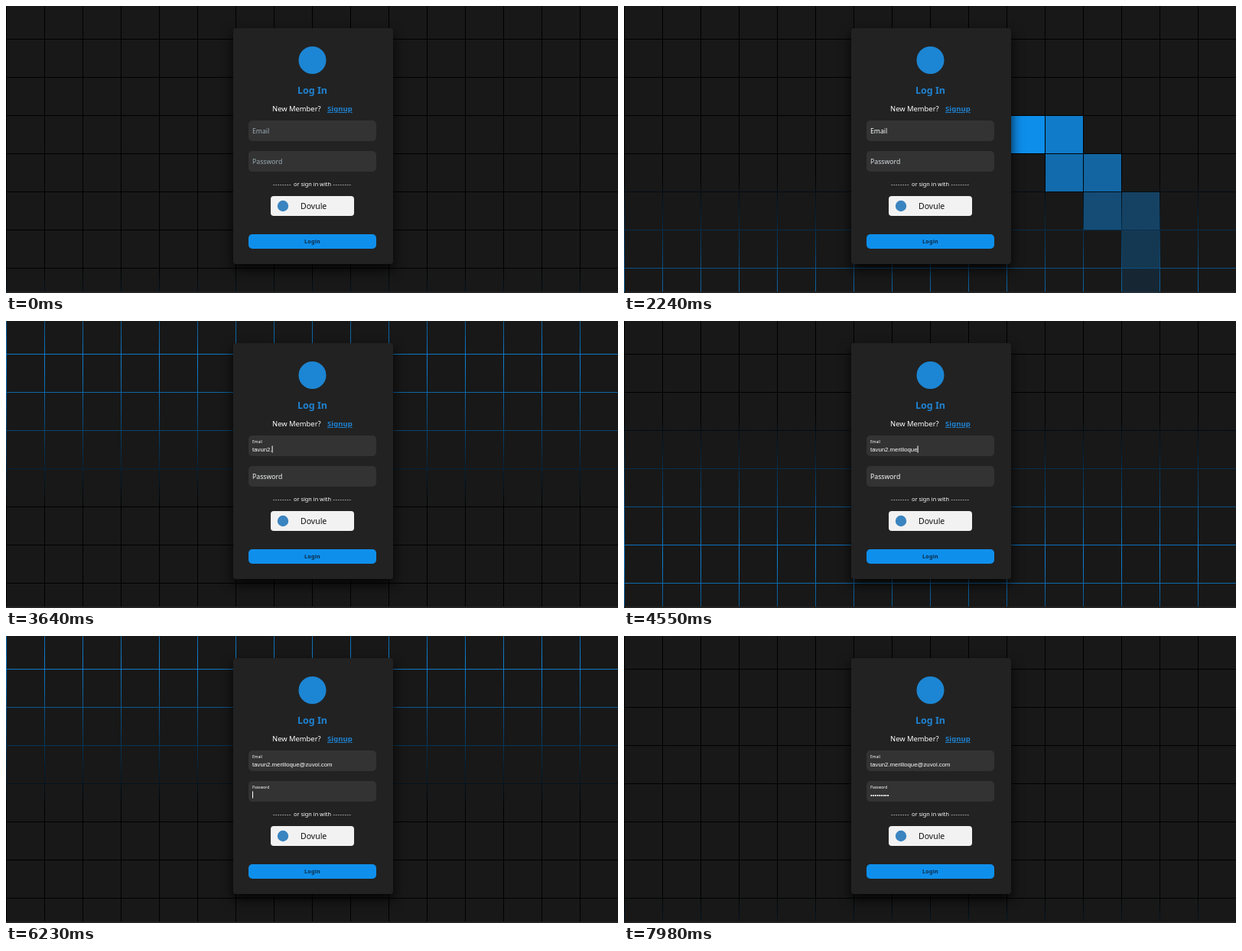
Animation of 800 by 376 pixels, one loop 8 s. Source, as an HTML page:

```html
<!DOCTYPE html>
<html lang="en">
<head>
<meta charset="utf-8">
<title>Log In</title>
<style>
  html, body { margin: 0; width: 100%; height: 100%; overflow: hidden; background: #000; }
  svg { display: block; width: 100vw; height: 100vh; }
  text { font-family: "Noto Sans", "Open Sans", sans-serif; white-space: pre; }
  .sweep { animation: sweep 2666.667ms linear -2556.667ms infinite; }
  .trail rect { fill: #0f8fec; animation: fade 8s infinite; }
  .field { fill: #333; }
  .value { font: 7.8px "Liberation Sans", Arial, sans-serif; fill: #fff; }
  .label { font-size: 8.7px; fill: #9babb3; animation: 8s infinite; }
  #emailLabel { animation-name: floatEmail; }
  #passLabel { animation-name: floatPass; }
  @keyframes sweep {
    from { transform: translateY(-376px); }
    to { transform: translateY(376px); }
  }
  /* Each cell starts at the moment the pointer leaves it. */
  @keyframes fade {
    0% { opacity: 1; animation-timing-function: ease; }
    10%, 99.1% { opacity: 0; animation-timing-function: step-end; }
    99.11%, 100% { opacity: 1; }
  }
  @keyframes floatEmail {
    0%, 35% { transform: translate(322px, 167px); }
    37%, 100% { transform: translate(322px, 160px) scale(.58); fill: #fff; }
  }
  @keyframes floatPass {
    0%, 75.5% { transform: translate(322px, 207px); }
    77.3%, 100% { transform: translate(322px, 200px) scale(.57); fill: #fff; }
  }
</style>
</head>
<body>
<svg viewBox="0 0 800 376" preserveAspectRatio="none">
  <defs>
    <linearGradient id="glow" x2="0" y2="1">
      <stop stop-color="#000"/>
      <stop offset=".5" stop-color="#1080d2"/>
      <stop offset="1" stop-color="#000"/>
    </linearGradient>
    <pattern id="cells" width="50" height="50" patternUnits="userSpaceOnUse" patternTransform="translate(0 43)">
      <rect x="1" y="1" width="49" height="49" fill="#181818"/>
    </pattern>
    <filter id="shadow" x="-20%" y="-20%" width="140%" height="140%">
      <feDropShadow dx="0" dy="7" stdDeviation="8" flood-color="#000" flood-opacity=".85"/>
    </filter>
  </defs>

  <rect width="800" height="376"/>
  <rect class="sweep" width="800" height="376" fill="url(#glow)"/>
  <rect width="800" height="376" fill="url(#cells)"/>
  <rect y="374" width="800" height="2" fill="#242424"/>
  <g class="trail" id="trail"></g>

  <rect x="297" y="29" width="209" height="309" rx="4" fill="#222" filter="url(#shadow)"/>
  <circle cx="400.5" cy="71" r="18" fill="#1c86d4"/>
  <text x="381" y="115" font-size="12.5" font-weight="700" fill="#1f83d2">Log In</text>
  <text x="348" y="138" font-size="9.4" fill="#fff">New Member?</text>
  <text x="420" y="138" font-size="9.5" font-weight="700" fill="#1f83d2" text-decoration="underline">Signup</text>

  <rect class="field" x="317" y="150" width="167" height="27" rx="5"/>
  <rect class="field" x="317" y="190" width="167" height="27" rx="5"/>
  <text class="label" id="emailLabel">Email</text>
  <text class="label" id="passLabel">Password</text>
  <text class="value" id="email" x="322" y="171"></text>
  <text class="value" id="pass" x="322" y="210.5"></text>
  <rect id="caret" width="1" height="9" fill="#fff"/>

  <g font-size="7.35" fill="#fff">
    <text x="349" y="236" letter-spacing=".65">--------</text>
    <text x="376" y="236">or sign in with</text>
    <text x="427.5" y="236" letter-spacing=".65">--------</text>
  </g>
  <rect x="346" y="249" width="109" height="26" rx="4" fill="#f2f2f2"/>
  <circle cx="362" cy="262" r="7.2" fill="#3a84c0"/>
  <text x="385" y="266" font-size="10.5" font-weight="500" fill="#111">Dovule</text>
  <rect x="317" y="299" width="167" height="19" rx="5" fill="#0f8fec"/>
  <text x="390" y="310.5" font-size="7.1" font-weight="700" letter-spacing=".25" fill="#0b2a45">Login</text>
</svg>
<script>
  const LOOP = 8000, BLINK = 280;
  const $ = id => document.getElementById(id);

  // Column, row and leave time of each cell under the pointer.
  const path = [
    [13, 6, 1775], [13, 5, 1895], [13, 4, 1940], [12, 4, 1980],
    [12, 3, 2060], [11, 3, 2080], [11, 2, 2130], [10, 2, 2235]
  ];
  for (const [col, row, leave] of path) {
    const cell = document.createElementNS("http://www.w3.org/2000/svg", "rect");
    const y = 44 + row * 50;
    const attrs = { x: col * 50 + 1, y, width: 49, height: Math.min(49, 376 - y) };
    for (const name in attrs) cell.setAttribute(name, attrs[name]);
    cell.style.animationDelay = `${leave - LOOP}ms`;
    $("trail").append(cell);
  }

  const fields = [
    { node: $("email"), text: "tavun2.merilloque@zuvol.com", focus: 2800, blur: 6100, first: 3060, step: 91, caretY: 163.5 },
    { node: $("pass"), text: "•".repeat(9), focus: 6100, blur: LOOP, first: 6380, step: 90, caretY: 203.5 }
  ];

  function drawField(field, t) {
    const { node, text, focus, blur, first, step, caretY } = field;
    const count = Math.max(0, Math.min(text.length, Math.floor((t - first) / step) + 1));
    if (node.textContent.length !== count) node.textContent = text.slice(0, count);
    if (t < focus || t >= blur) return false;
    const lastKey = count ? first + (count - 1) * step : focus;
    $("caret").setAttribute("x", 322 + (count ? node.getComputedTextLength() : 0));
    $("caret").setAttribute("y", caretY);
    return Math.floor((t - lastKey) / BLINK) % 2 === 0;
  }

  let start;
  function frame(now) {
    start ??= now;
    const t = (now - start) % LOOP;
    const shown = fields.map(field => drawField(field, t)).some(Boolean);
    $("caret").style.visibility = shown ? "visible" : "hidden";
    requestAnimationFrame(frame);
  }
  requestAnimationFrame(frame);
</script>
</body>
</html>
```
